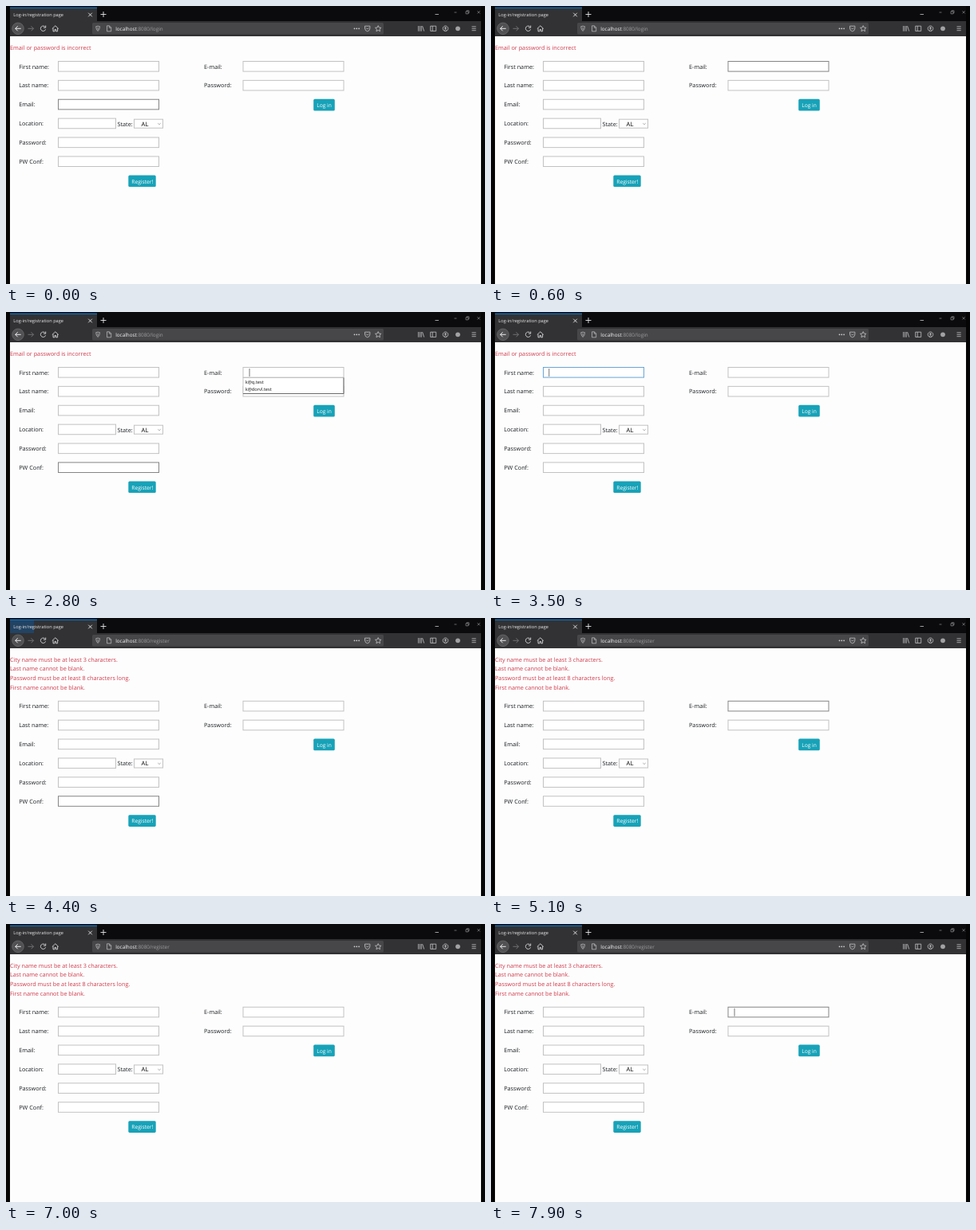
Recreate the animation shown at these times as an HTML page. Size 600 by 349 pixels, loop 8 s.

```html
<!DOCTYPE html>
<html lang="en">
<head>
<meta charset="utf-8">
<title>Log-in/registration page</title>
<style>
html, body { margin: 0; width: 100%; height: 100%; overflow: hidden; background: #050506; }
svg { display: block; width: 600px; height: 349px; }
text { font-family: "Open Sans", "Noto Sans", sans-serif; text-rendering: geometricPrecision; white-space: pre; }
</style>
</head>
<body>
<svg id="stage" viewBox="0 0 600 349"></svg>
<script>
const NS = 'http://www.w3.org/2000/svg';
const LOOP = 8000, SHIFT = 34.8;
const LINE = '#c2c2c2', HOVER = '#858585', FOCUS = '#6aa6d6', INK = '#1b1f23';
const TEAL = '#17a2b8', TEAL_DARK = '#138496';
const stage = document.getElementById('stage');

function add(parent, tag, attrs = {}, content) {
  const el = document.createElementNS(NS, tag);
  for (const k in attrs) el.setAttribute(k, attrs[k]);
  if (content) el.textContent = content;
  parent.append(el);
  return el;
}
const rect = (p, x, y, width, height, fill, more) => add(p, 'rect', { x, y, width, height, fill, ...more });
const label = (p, x, y, str, size = 7.28, fill = INK) => add(p, 'text', { x, y, 'font-size': size, fill }, str);
const icon = (d, stroke = '#c4c4c6', width = .8) =>
  add(stage, 'path', { d, fill: 'none', stroke, 'stroke-width': width });
const show = (el, on) => el.setAttribute('visibility', on ? 'visible' : 'hidden');

// Browser frame
rect(stage, 0, 0, 600, 349, '#050506');
rect(stage, 5, 0, 590, 19, '#0b0b0d');
rect(stage, 5, 2, 109, 17, '#323234');
rect(stage, 5, 1.6, 109, 1.4, '#0a6fc4');
rect(stage, 5, 19, 590, 19, '#323234');
rect(stage, 5, 38, 590, 311, '#fdfdfd');
const burst = rect(stage, 5, 3, 30, 16, '#1d4d7c', { opacity: .65 });
label(stage, 9.3, 13, 'Log-in/registration page', 5.65, '#e8e8ea');
icon('M103.2 8.7l4.6 4.6m0-4.6l-4.6 4.6M122 7v7m-3.5-3.5h7', '#e8e8ea', .9);
icon('M537.5 10.5h4.5');
icon('M561.5 8h3M576 6.8h3v3h-3zM577 6.8v-1h3v3h-1M590.5 6.2l3.2 3.2m0-3.2l-3.2 3.2', '#a4a4a6', .6);

// Toolbar
add(stage, 'circle', { cx: 15, cy: 28.3, r: 7.3, fill: '#515153', stroke: '#77777a', 'stroke-width': .6 });
icon('M18.7 28.3h-7m3-3l-3 3l3 3', '#ececee', 1);
icon('M27.5 28.3h7m-3-3l3 3l-3 3', '#77777a', .9);
icon('M49.3 26.6a3.2 3.2 0 1 0 .3 2.7M49.7 24.5v2.7h-2.7', '#d6d6d8', .9);
icon('M57.8 28.5l4-3.7l4 3.7M59 28v3.8h2v-2.3h1.6v2.3h2v-3.8', '#d6d6d8', .9);
rect(stage, 108, 21, 365, 14.5, '#474749', { rx: 1.5 });
icon('M112.7 25.7q1.5 0 2.4-.7q.9.7 2.4.7q0 4-2.4 5.8q-2.4-1.8-2.4-5.8zM115.1 26.6v3.4', '#c4c4c6', .7);
icon('M126.5 24.8h3l2.2 2.2v4.8h-5.2zM129.3 25v2.2h2.2', '#c4c4c6', .7);
label(stage, 137.2, 30.6, 'localhost', 6.35, '#f8f8fa');
const path = label(stage, 163.7, 30.6, '', 6.35, '#9c9ca0');
for (const x of [436.5, 439.3, 442.1]) add(stage, 'circle', { cx: x, cy: 28.3, r: .85, fill: '#d4d4d6' });
icon('M449.5 25.2h6.4v2.8q-.4 3.5-3.2 3.8q-2.8-.3-3.2-3.8zM451 27.4l1.7 1.7l1.7-1.7');
icon('M466.2 24.6l1.1 2.4l2.6.3l-1.9 1.8l.5 2.6l-2.3-1.3l-2.3 1.3l.5-2.6l-1.9-1.8l2.6-.3z');
icon('M516.5 25v6.7M518.5 25v6.7M520.4 25v6.7M521.6 25.2l2.1 6.4');
icon('M531.7 25.2h7v6.2h-7zM534.2 25.2v6.2');
icon('M550.5 25a3.3 3.3 0 1 0 .01 0M548.7 30.6q1.8-2 3.6 0');
add(stage, 'circle', { cx: 550.5, cy: 27.6, r: 1.2, fill: '#c4c4c6' });
add(stage, 'circle', { cx: 566, cy: 28.3, r: 2.9, fill: '#a2a2a5' });
icon('M583.5 25.9h5.2m-5.2 2.4h5.2m-5.2 2.4h5.2');

// Messages
const RED = '#d03a4b';
const messages = list => {
  const g = add(stage, 'g');
  list.forEach((str, i) => label(g, 5, 54.7 + i * 11.62, str, 7.28, RED));
  return g;
};
const loginError = messages(['Email or password is incorrect']);
const formErrors = messages([
  'City name must be at least 3 characters.',
  'Last name cannot be blank.',
  'Password must be at least 8 characters long.',
  'First name cannot be blank.'
]);

// Forms
const forms = add(stage, 'g');
const fields = {}, buttons = {};
function field(id, row, x, width, name, labelX) {
  const y = 69 + row * 23.88;
  label(forms, labelX, y + 9.6, name);
  fields[id] = rect(forms, x + .5, y + .5, width - 1, 12.6, '#fff', { stroke: LINE });
}
function button(id, x, y, width, str) {
  buttons[id] = rect(forms, x, y, width, 14.7, TEAL, { rx: 1.6 });
  label(forms, x + 4, y + 10.1, str, 6.7, '#fff');
}
[['first', 'First name:'], ['last', 'Last name:'], ['email', 'Email:'],
 ['city', 'Location:'], ['pass', 'Password:'], ['conf', 'PW Conf:']]
  .forEach(([id, name], i) => field(id, i, 65, id === 'city' ? 73 : 127, name, 16.2));
field('user', 0, 296.5, 127, 'E-mail:', 248);
field('key', 1, 296.5, 127, 'Password:', 248);
label(forms, 139.5, 150.5, 'State:');
rect(forms, 160.5, 142.2, 36, 11, '#fff', { stroke: LINE });
label(forms, 169.6, 150.5, 'AL', 7.6, '#000');
add(forms, 'path', { d: 'M190.3 147.2l1.7 1.6l1.7-1.6', fill: 'none', stroke: '#888', 'stroke-width': .7 });
button('register', 153.3, 212.4, 34.4, 'Register!');
button('login', 385.2, 116.8, 26.6, 'Log in');

const menu = add(forms, 'g');
rect(menu, 297, 82.5, 126, 20, '#fff', { stroke: '#b8b8b8', 'stroke-width': .8 });
add(menu, 'path', { d: 'M297 102.5h126v-20', fill: 'none', stroke: '#6a6a6a' });
label(menu, 299.7, 89.9, 'k@q.test', 5.7, '#111');
label(menu, 299.7, 99.4, 'k@dorvl.test', 5.7, '#111');
const caret = rect(forms, 0, 71, .8, 10, '#555');

// Each step changes part of the state from its time on
const START = { page: 'login', hover: '', focus: '', ring: false, caret: false, menu: false, burst: false };
const STEPS = [
  [0, { hover: 'email' }],
  [200, { hover: '' }],
  [600, { hover: 'user' }],
  [1000, { focus: 'user', caret: true }],
  [1100, { menu: true }],
  [1600, { caret: false }],
  [1700, { hover: '' }],
  [2100, { caret: true }],
  [2400, { hover: 'first' }],
  [2600, { hover: 'pass' }],
  [2700, { hover: 'conf' }],
  [2900, { hover: 'last' }],
  [3100, { hover: 'first' }],
  [3200, { focus: 'first', menu: false }],
  [3400, { hover: '', ring: true }],
  [3700, { caret: false }],
  [3900, { hover: 'conf' }],
  [4000, { hover: 'register' }],
  [4200, { caret: true }],
  [4400, { page: 'register', hover: 'conf', focus: '', ring: false, caret: false, burst: true }],
  [4600, { burst: false }],
  [4800, { hover: '' }],
  [5100, { hover: 'user' }],
  [5300, { focus: 'user', caret: true }],
  [5400, { menu: true }],
  [5700, { hover: '', ring: true }],
  [5800, { caret: false }],
  [6100, { caret: true }],
  [6300, { menu: false, hover: 'conf' }],
  [6500, { hover: 'register' }],
  [6700, { focus: '', ring: false, caret: false, burst: true }],
  [6900, { burst: false, hover: '' }],
  [7200, { hover: 'login' }],
  [7400, { hover: 'user' }],
  [7500, { focus: 'user', caret: true }]
];

function render(t) {
  const s = { ...START };
  for (const [at, change] of STEPS) if (at <= t) Object.assign(s, change);
  const moved = s.page === 'register';
  path.textContent = ':8080/' + s.page;
  show(loginError, !moved);
  show(formErrors, moved);
  show(burst, s.burst);
  show(menu, s.menu);
  show(caret, s.caret);
  forms.setAttribute('transform', `translate(0 ${moved ? SHIFT : 0})`);
  caret.setAttribute('x', s.focus === 'first' ? 72.4 : 304.6);
  for (const id in fields) {
    const color = id === s.hover ? HOVER : id === s.focus && s.ring ? FOCUS : LINE;
    fields[id].setAttribute('stroke', color);
  }
  for (const id in buttons) buttons[id].setAttribute('fill', id === s.hover ? TEAL_DARK : TEAL);
}

const begin = performance.now();
function tick() {
  render((performance.now() - begin) % LOOP);
  requestAnimationFrame(tick);
}
tick();
</script>
</body>
</html>
```
